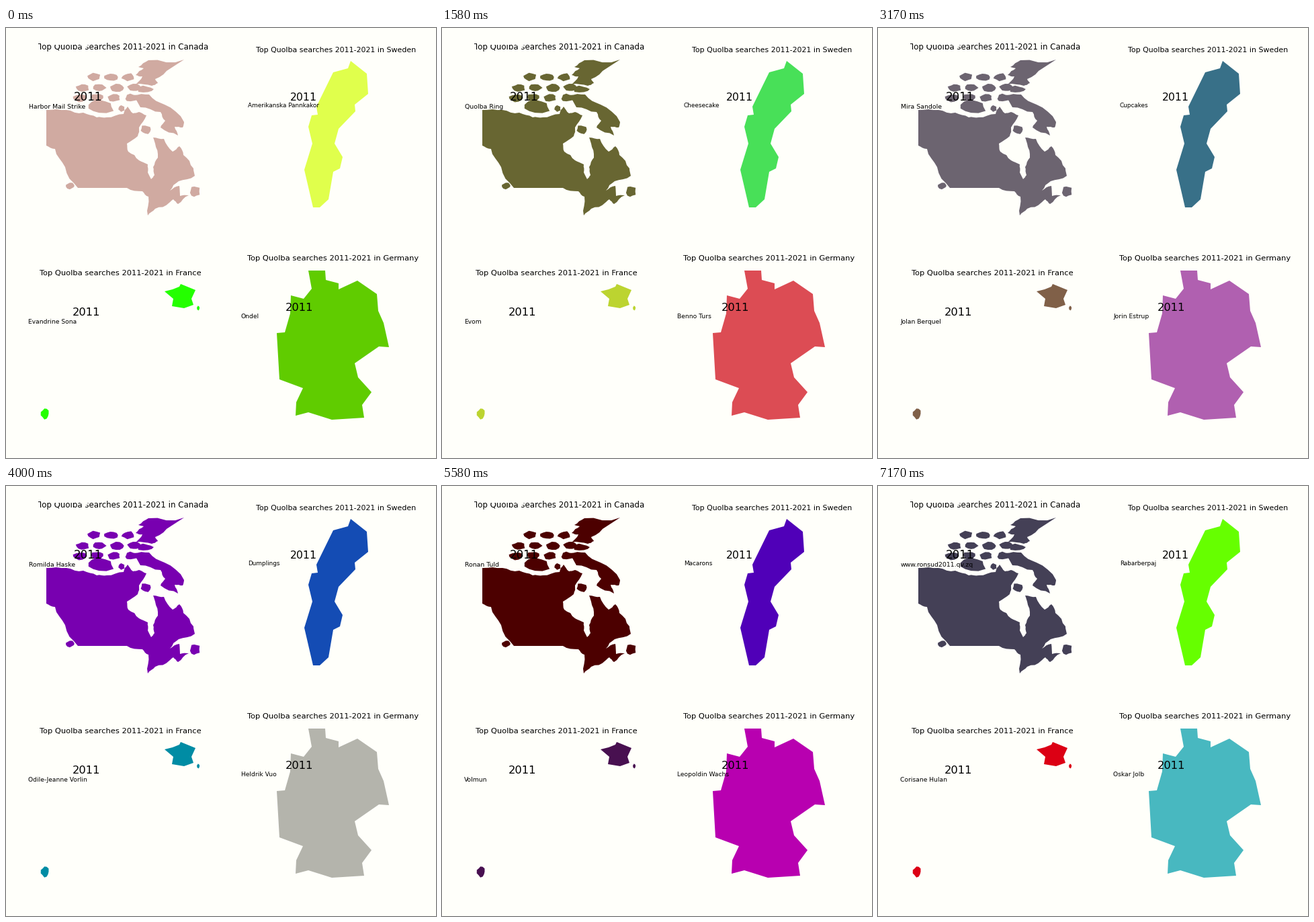
These frames come from a looping animation (640 px wide and 640 px high, 8 s). A matplotlib script:

```python
import matplotlib.pyplot as plt
import numpy as np
from matplotlib.animation import FuncAnimation
from matplotlib.collections import PolyCollection
from matplotlib.patches import Polygon

SIZE, DPI = 640, 80
STEP, LOOP = 25, 8000
STATES, TICKS = 10, 96
# the loop has 96 ticks; each switch falls on a whole tick
SWITCHES = [round(k * TICKS / STATES) * LOOP / TICKS for k in range(1, STATES)]
PAPER = "#fffffa"
rng = np.random.default_rng(4)


def coast(points, amp=0.1):
    """Roughen a line twice by pushing midpoints sideways."""
    line = np.array(points, float)
    for _ in range(2):
        side = np.diff(line, axis=0)[:, ::-1] * (1, -1)
        push = rng.uniform(-amp, amp, (len(side), 1))
        middle = (line[1:] + line[:-1]) / 2 + side * push
        line = np.insert(line, range(1, len(line)), middle, axis=0)
    return line.tolist()


def island(x, y, rx, ry, n=11):
    """Ellipse with a ragged shore."""
    a = np.arange(n) * 2 * np.pi / n
    r = rng.uniform(0.75, 1.1, n)
    return np.column_stack([x + rx * r * np.cos(a), y + ry * r * np.sin(a)])


def canada():
    north = [(60, 122), (90, 122), (115, 126), (135, 133), (150, 133), (175, 128),
             (181, 117), (189, 127), (198, 125), (209, 130), (198, 148), (196, 161)]
    hudson = [(180, 172), (182, 184), (198, 197), (211, 203), (211, 215), (216, 225),
              (221, 219), (219, 207), (226, 193), (222, 172), (219, 163)]
    east = [(235, 165), (248, 184), (258, 176), (264, 189), (279, 209), (281, 220),
            (257, 228), (244, 242), (258, 235), (259, 250), (272, 249), (256, 262)]
    south = [(249, 255), (243, 260), (222, 269), (211, 279), (212, 251), (203, 243),
             (180, 238)]
    west = [(107, 238), (88, 207), (73, 180), (60, 175)]
    baffin = [(190, 100), (213, 99), (236, 114), (265, 140), (263, 148), (251, 147),
              (256, 160), (230, 148), (237, 138), (230, 125), (200, 118)]
    ellesmere = [(265, 47), (212, 48), (197, 58), (205, 60), (193, 70), (203, 72),
                 (193, 84), (217, 86), (226, 82), (222, 76), (245, 60)]
    shapes = [coast(north + hudson + east + south) + coast(west),
              coast(baffin), coast(ellesmere)]
    # rows of Arctic islands
    for y, x0, count in [(73, 131, 3), (89, 114, 4), (104, 110, 4)]:
        shapes += [island(x0 + 25.5 * k, y, 10, 6) for k in range(count)]
    shapes += [island(141, 117, 21, 11), island(172, 120, 5, 5), island(206, 91, 13, 5),
               island(208, 151, 8, 7), island(281, 243, 8, 9), island(96, 235, 7, 5)]
    return shapes


SWEDEN = [[
    (513, 49), (537, 68), (539, 98), (519, 114), (520, 124), (495, 150), (489, 172),
    (501, 192), (497, 209), (487, 214), (480, 255), (467, 267), (457, 267), (444, 211),
    (456, 172), (450, 147), (455, 130), (464, 129), (462, 117), (487, 66), (509, 60),
]]
FRANCE = [
    [(260, 381), (282, 390), (276, 403), (279, 412), (265, 417), (247, 414), (249, 403),
     (236, 392), (248, 389), (258, 385)],
    island(286, 417, 2, 3.5),
    island(58, 574, 6, 8),
]
GERMANY = [[
    (450, 361), (475, 361), (476, 375), (495, 380), (495, 389), (523, 376), (552, 396),
    (554, 421), (562, 439), (570, 475), (555, 474), (519, 499), (524, 520), (544, 542),
    (530, 561), (533, 580), (485, 583), (450, 572), (431, 577), (432, 557), (442, 536),
    (407, 523), (403, 454), (415, 453), (423, 425), (424, 398), (443, 403), (455, 388),
]]

# name, shapes, title size in px, then left/baseline of title, year and term
PANELS = [
    ("Canada", canada(), 11.75, (48, 32), (101, 108), (33.5, 120)),
    ("Sweden", SWEDEN, 11.05, (372, 36), (423, 107.5), (359.8, 118.5)),
    ("France", FRANCE, 11.45, (50, 368.5), (99, 428), (33.2, 439.8)),
    ("Germany", GERMANY, 11.45, (359, 346.5), (416, 421), (350, 432.5)),
]
TERMS = [
    ["Harbor Mail Strike", "Elvin Marsk", "Quolba Ring", "Joel Hanvik", "Mira Sandole",
     "Romilda Haske", "Rudo Olmar", "Ronan Tuld", "Orvath", "www.ronsud2011.qv.zq"],
    ["Amerikanska Pannkakor", "Brownies", "Cheesecake", "Chokadbollar", "Cupcakes",
     "Dumplings", "Kladdkaka", "Macarons", "Pannkakor", "Rabarberpaj"],
    ["Evandrine Sona", "Aurel Tivane", "Evom", "Bvk", "Jolan Berquel",
     "Odile-Jeanne Vorlin", "Mazil Corvane", "Volmun", "Jonna Haddelun", "Corisane Hulan"],
    ["Ondel", "Anke Borlau", "Benno Turs", "Leonanda Grisbao", "Jorin Estrup",
     "Heldrik Vuo", "Rike Sommat", "Leopoldin Wachs", "Daluna Kolvez", "Oskar Jolb"],
]
COLORS = [row.split() for row in (
    "#d0aaa1 #8c7c70 #686632 #70b800 #6c6470 #7800b0 #70404c #4c0000 #44e410 #444056",
    "#e0ff4c #90d060 #48e058 #1c6474 #387088 #144cb4 #4048a8 #5000b8 #88d80c #66ff00",
    "#24ff00 #80c030 #bcd430 #c42400 #806048 #008ca4 #406080 #481050 #d88808 #dc0014",
    "#60cc00 #a08c48 #dc4c54 #b400d4 #b060b0 #b4b4ac #b06cac #b800b0 #f6ce58 #48b8c0",
)]

plt.rcParams["font.family"] = "DejaVu Sans"
fig = plt.figure(figsize=(SIZE / DPI, SIZE / DPI), dpi=DPI, facecolor=PAPER)
ax = fig.add_axes([0, 0, 1, 1])
ax.set(xlim=(0, SIZE), ylim=(SIZE, 0))
ax.axis("off")


def write(pos, text, px, z=4):
    return ax.text(*pos, text, size=px * 72 / DPI, color="black",
                   ha="left", va="baseline", zorder=z)


maps, labels = [], []
for name, shapes, px, title_at, year_at, term_at in PANELS:
    land = PolyCollection(shapes, linewidths=0, zorder=1)
    maps.append(ax.add_collection(land, autolim=False))
    write(title_at, f"Top Quolba searches 2011-2021 in {name}", px, 2)
    write(year_at, "2011", px * 1.42)
    labels.append(write(term_at, "", px * 0.8))

# blank area that clips the top of the first title
ax.add_patch(Polygon([(52, 18), (52, 25), (110, 25), (115, 28.5), (121, 28.5), (123, 18)],
                     facecolor=PAPER, lw=0, zorder=3))


def update(i):
    # a switch shows in the frame whose time span contains it
    state = sum(t < (i + 1) * STEP for t in SWITCHES)
    for land, label, colors, terms in zip(maps, labels, COLORS, TERMS):
        land.set_facecolor(colors[state])
        label.set_text(terms[state])
    return maps + labels


anim = FuncAnimation(fig, update, frames=LOOP // STEP, interval=STEP,
                     repeat=True, repeat_delay=0)
plt.show()
```
